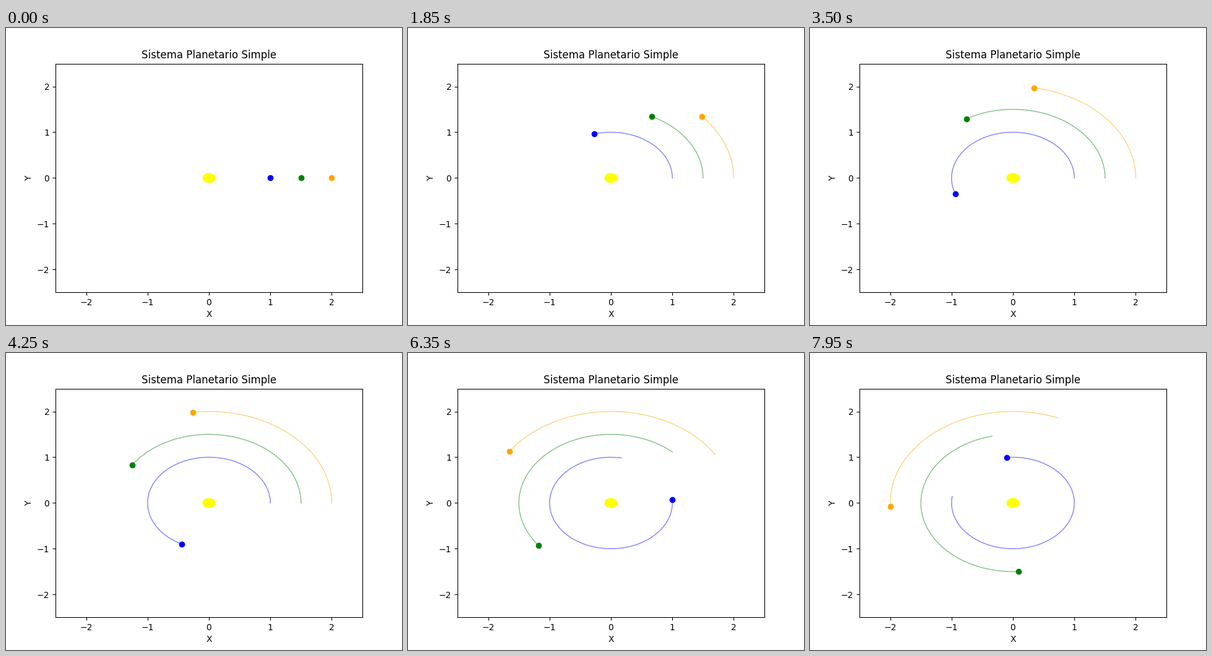
Recreate the animation shown at these times as a matplotlib script. Size 640 px wide and 480 px high, loop 8000 ms.

```python
import numpy as np
import matplotlib.pyplot as plt
from matplotlib.animation import FuncAnimation

FRAMES = 160
INTERVAL = 50
TRAIL = 100  # points kept in each trail

# orbit radius, radians per frame, colour
PLANETS = [
    (1.0, 0.05, "blue"),
    (1.5, 0.03, "green"),
    (2.0, 0.02, "orange"),
]

fig, ax = plt.subplots(figsize=(6.4, 4.8), dpi=100)
ax.set_xlim(-2.5, 2.5)
ax.set_ylim(-2.5, 2.5)
ax.set_title("Sistema Planetario Simple")
ax.set_xlabel("X")
ax.set_ylabel("Y")

ax.add_patch(plt.Circle((0, 0), 0.1, color="yellow"))
trails = [ax.plot([], [], "-", color=c, lw=1, alpha=0.5)[0] for _, _, c in PLANETS]
dots = [ax.plot([], [], "o", color=c)[0] for _, _, c in PLANETS]


def update(frame):
    steps = np.arange(max(0, frame - TRAIL + 1), frame + 1)
    for (radius, speed, _), trail, dot in zip(PLANETS, trails, dots):
        x = radius * np.cos(speed * steps)
        y = radius * np.sin(speed * steps)
        trail.set_data(x, y)
        dot.set_data(x[-1:], y[-1:])
    return trails + dots


anim = FuncAnimation(fig, update, frames=FRAMES, interval=INTERVAL, repeat=True)
plt.show()
```
